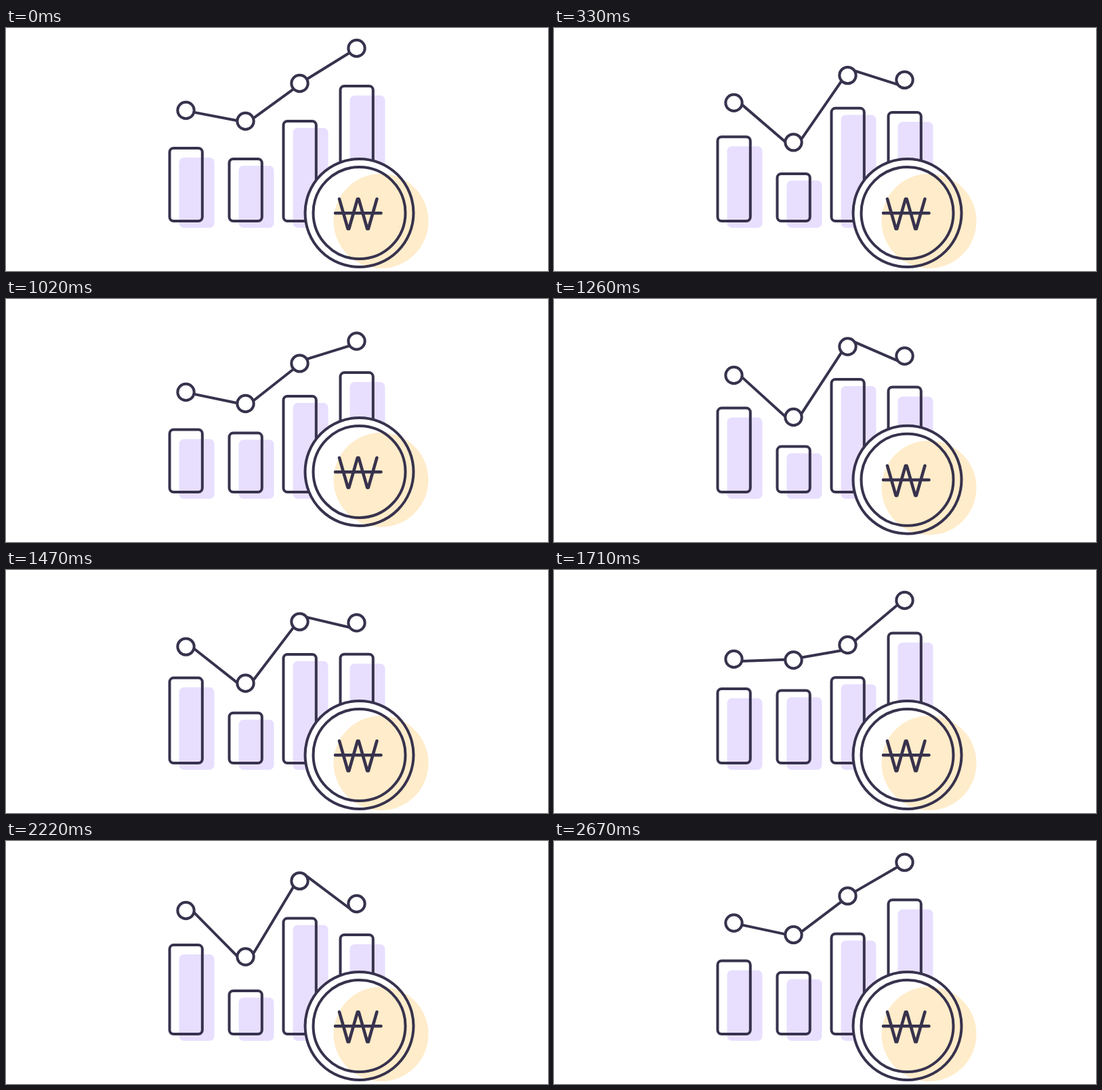
These frames come from a looping animation (800x360 px, 2.7 s). An HTML page:

```html
<!DOCTYPE html>
<html lang="en">
<head>
<meta charset="utf-8">
<title>Bar chart with coin</title>
<style>
  html, body { margin: 0; width: 100%; height: 100%; overflow: hidden; background: #fff; }
  svg { display: block; width: 100%; height: 100%; }
  .ink { fill: none; stroke: #37324d; stroke-width: 4; stroke-linecap: round; stroke-linejoin: round; }
  .white { fill: #fff; }
  .shade { fill: #e8dfff; }
  .glow { fill: #ffecca; }
  .sign { stroke-width: 4.6; }
</style>
</head>
<body>
<svg viewBox="0 0 800 360">
  <g id="shades"></g>
  <g id="bars"></g>
  <g id="links"></g>
  <g id="dots"></g>
  <g id="coin">
    <circle class="white" cx="521.5" cy="274" r="80"/>
    <circle class="glow" cx="553.5" cy="286" r="70"/>
    <circle class="ink" cx="521.5" cy="274" r="80"/>
    <circle class="ink" cx="521.5" cy="274" r="68"/>
    <path class="ink sign" d="M492 253.3L504.6 297.5H506.2L518.8 253.3H520.6L533.2 297.5H534.8L547.4 253.3M486 274.3H553.5"/>
  </g>
</svg>
<script>
const LOOP = 2700, STEP = 30, BEAT = 450, FLOOR = 286;

// Top edge of each bar and height of each dot, one value per beat.
const columns = [
  { x: 241.5, drop: 14, bar: [178, 156.5, 204.3, 154.4, 179.6, 153.4], dot: [122, 107.6, 146.4, 107.4, 136.1, 102.2] },
  { x: 329.5, drop: 10, bar: [194, 222, 191.8, 223, 171.1, 223.2],     dot: [138, 178, 148.3, 179.4, 125.8, 172.7] },
  { x: 409.5, drop: 10, bar: [138, 113.5, 152.4, 113.4, 166.8, 113.2], dot: [82, 66.8, 103.8, 65, 118.7, 57.6] },
  { x: 493.5, drop: 14, bar: [86, 135.7, 101.8, 135.3, 86.5, 140.3],   dot: [30, 89.8, 55.1, 89.4, 37.6, 94.4] }
];

// Link ends: x, and y offset from the dot they follow.
const links = [
  [277.5, 2.9, 341.5, -0.7],
  [364.5, -3.8, 424.5, 8.3],
  [444.5, -6.5, 507, 6.8]
];

const jump = { start: 750, peak: 1050, end: 1380, height: 19 };

const $ = id => document.getElementById(id);

function add(parent, tag, attrs) {
  const el = document.createElementNS("http://www.w3.org/2000/svg", tag);
  set(el, attrs);
  return $(parent).appendChild(el);
}

function set(el, attrs) {
  for (const key in attrs) el.setAttribute(key, attrs[key]);
}

// cubic-bezier(.2, 0, .8, 1)
function ease(u) {
  if (u <= 0) return 0;
  if (u >= 1) return 1;
  let lo = 0, hi = 1;
  for (let i = 0; i < 24; i++) {
    const s = (lo + hi) / 2;
    if (s * (0.6 + s * (1.2 - 0.8 * s)) < u) lo = s; else hi = s;
  }
  return lo * lo * (3 - 2 * lo);
}

function sample(values, t) {
  const i = Math.floor(t / BEAT);
  const a = values[i], b = values[(i + 1) % values.length];
  return a + (b - a) * ease(t / BEAT - i);
}

function lift(t) {
  const { start, peak, end, height } = jump;
  return height * (t < peak ? ease((t - start) / (peak - start)) : 1 - ease((t - peak) / (end - peak)));
}

for (const c of columns) {
  c.shadeEl = add("shades", "rect", { class: "shade", x: c.x + 14, width: 52, rx: 7 });
  c.barEl = add("bars", "rect", { class: "ink", x: c.x, width: 48.3, rx: 6 });
  c.dotEl = add("dots", "circle", { class: "ink", style: "fill:#fff", cx: c.x + 24, r: 12.2 });
}
const lines = links.map(([x1, , x2]) => add("links", "line", { class: "ink", x1, x2 }));

function draw(t) {
  const dots = columns.map(c => {
    const top = sample(c.bar, t), cy = sample(c.dot, t);
    set(c.barEl, { y: top, height: FLOOR - top });
    set(c.shadeEl, { y: top + c.drop, height: FLOOR + 10 - top - c.drop });
    set(c.dotEl, { cy });
    return cy;
  });
  lines.forEach((el, i) => set(el, { y1: dots[i] + links[i][1], y2: dots[i + 1] + links[i][3] }));
  set($("coin"), { transform: `translate(0 ${-lift(t)})` });
}

const begin = performance.now();
function tick() {
  const t = (performance.now() - begin) % LOOP;
  draw(Math.floor(t / STEP) * STEP);
  requestAnimationFrame(tick);
}
tick();
</script>
</body>
</html>
```
